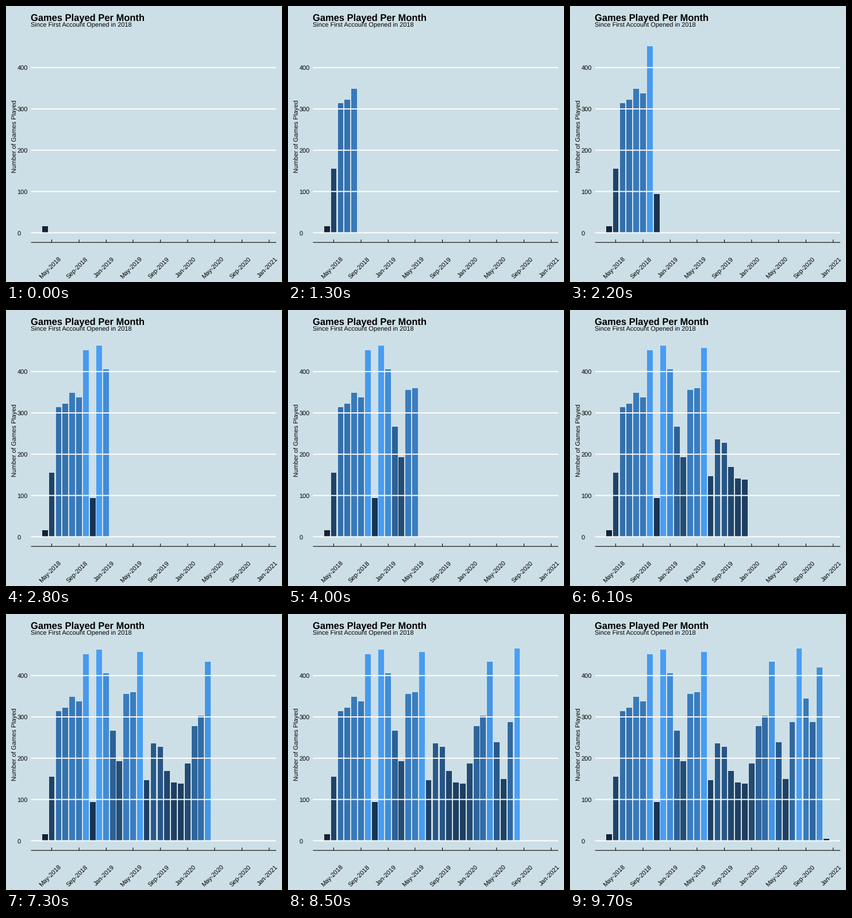
Animation of 480 by 480 pixels, one loop 10 s. Source, as a matplotlib script:

```python
import numpy as np
import matplotlib.pyplot as plt
from matplotlib.animation import FuncAnimation
from matplotlib.patches import Rectangle

plt.rcParams.update({"font.family": "Liberation Sans", "font.size": 11,
                     "text.hinting": "none"})

SIZE = 480
LEFT, RIGHT = 43.5, 470
ZERO_Y, PX_PER_GAME = 394.4, 0.7182
AXIS_Y = 411.15
MAY_X, PX_PER_DAY = 79.405, 0.3876
BAR_W = 25.2 * PX_PER_DAY
FRAMES, INTERVAL = 100, 100
HOLD = 3          # frames per bar
START = 4         # frame at which the second bar is complete

GAMES = [16, 155, 314, 322, 349, 338, 452, 94, 463, 406, 267,
         193, 356, 360, 457, 147, 236, 228, 169, 141, 138, 187,
         278, 303, 434, 239, 150, 288, 466, 345, 288, 420, 5]
LOW, HIGH = np.array([17, 34, 53]) / 255, np.array([72, 159, 245]) / 255

months = np.arange("2018-04", "2021-02", dtype="datetime64[M]")
days = (months.astype("datetime64[D]") - np.datetime64("2018-05-01")).astype(int)
month_x = MAY_X + days * PX_PER_DAY


def y_of(games):
    return ZERO_Y - games * PX_PER_GAME


def shade(games):
    t = (games - min(GAMES)) / (max(GAMES) - min(GAMES))
    return LOW + (HIGH - LOW) * t ** 1.2


def place(bar, x, games, color):
    """Put a bar on whole pixels."""
    x0, x1 = round(x - BAR_W / 2), round(x + BAR_W / 2)
    top = round(y_of(games))
    bar.set_bounds(x0, top, x1 - x0, 394 - top)
    bar.set_facecolor(color)


fig = plt.figure(figsize=(SIZE / 72, SIZE / 72), dpi=72, facecolor="#cddfe6")
ax = fig.add_axes([0, 0, 1, 1])
ax.set(xlim=(0, SIZE), ylim=(SIZE, 0))
ax.axis("off")


def line(xs, ys, color, width, z):
    ax.plot(xs, ys, color=color, lw=width, zorder=z,
            solid_capstyle="butt", snap=False)


def new_bar():
    return ax.add_patch(Rectangle((0, 0), 0, 0, lw=0, antialiased=False, zorder=1))


ax.text(LEFT - 0.5, 25.2, "Games Played Per Month", size=16.5, weight="bold")
ax.text(LEFT - 0.5, 36.8, "Since First Account Opened in 2018")
ax.text(19, 226.8, "Number of Games Played", rotation=90, ha="center",
        va="baseline", rotation_mode="anchor")

for games in range(0, 401, 100):
    y = y_of(games)
    line([LEFT, RIGHT], [y, y], "white", 1.9, 2)
    ax.text(19.3, y + 4.1, str(games))

line([LEFT, RIGHT], [AXIS_Y, AXIS_Y], "black", 1.07, 3)
for month, x in zip(months[1::4], month_x[1::4]):
    line([x, x], [AXIS_Y - 5, AXIS_Y], "black", 1.07, 3)
    label = month.astype(object).strftime("%b-%Y")
    ax.text(x - 1, 457, label, rotation=45, ha="center", va="baseline",
            rotation_mode="anchor")

bars = [new_bar() for _ in GAMES]
for bar, x, games in zip(bars, month_x, GAMES):
    place(bar, x, games, shade(games))
mover = new_bar()


def draw(frame):
    count = 1 if frame < START else 2 + (frame - START) // HOLD
    for i, bar in enumerate(bars):
        bar.set_visible(i < count)

    # the second bar slides out of the first, easing out
    moving = START - HOLD < frame < START
    mover.set_visible(moving)
    if moving:
        t = (frame - START + HOLD) / HOLD
        k = 1 - (1 - t) ** 2
        x = month_x[0] + (month_x[1] - month_x[0]) * k
        games = GAMES[0] + (GAMES[1] - GAMES[0]) * k
        color = shade(GAMES[0]) * (1 - k) + shade(GAMES[1]) * k
        place(mover, x, games, color)
    return [*bars, mover]


anim = FuncAnimation(fig, draw, frames=FRAMES, interval=INTERVAL,
                     repeat=True, repeat_delay=0, blit=False)
plt.show()
```
